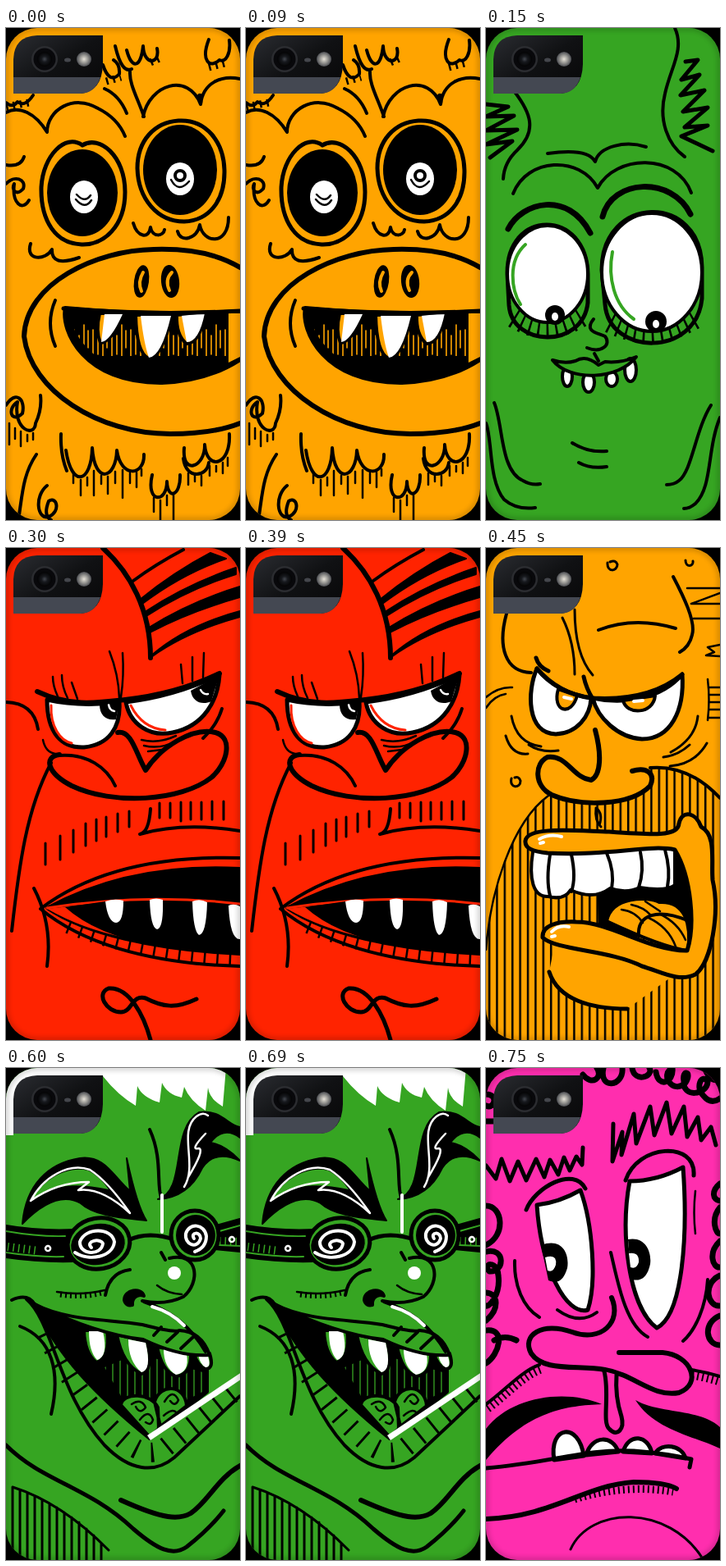
An HTML page for the animation above (900 ms loop, 285 px wide and 600 px high).

```html
<!DOCTYPE html>
<html lang="en">
<head>
<meta charset="utf-8">
<title>Monster phone cases</title>
<style>
html, body { margin: 0; width: 100%; height: 100%; overflow: hidden; background: #000; }
svg { display: block; width: 100vw; height: 100vh; fill: none; stroke: #000; stroke-width: 4; stroke-linecap: round; stroke-linejoin: round; }
.face { visibility: hidden; animation: show 900ms step-end infinite; animation-delay: calc(var(--i) * 150ms - 900ms); }
@keyframes show { 0% { visibility: visible; } 16.6667%, 100% { visibility: hidden; } }
.orange { fill: #ffa400; } .green { fill: #36a522; } .red { fill: #ff2300; } .pink { fill: #ff2eae; }
.w { fill: #fff; } .k { fill: #000; } .flat { stroke: none; }
.thin { stroke-width: 2.5; } .mid { stroke-width: 5; } .bold { stroke-width: 6; }
.light { stroke: #fff; }
.tick { stroke-linecap: butt; stroke-width: var(--w, 14); stroke-dasharray: var(--d, 2.5 6); }
</style>
</head>
<body>
<svg viewBox="0 0 285 600" preserveAspectRatio="none">
<defs>
  <clipPath id="case"><rect width="285" height="600" rx="38"/></clipPath>
  <pattern id="drip" width="23" height="200" patternUnits="userSpaceOnUse">
    <path stroke="#ffa400" stroke-width="1.6" d="M3 162V205M8 169V190M14 168V200M20 175V198"/>
  </pattern>
  <pattern id="beard" width="9.4" height="20" patternUnits="userSpaceOnUse"><path d="M4 0V20" stroke-width="2.5"/></pattern>
  <pattern id="fangs" width="9" height="20" patternUnits="userSpaceOnUse"><path d="M4 0V20" stroke="#36a522" stroke-width="1.3"/></pattern>
  <linearGradient id="glass" x2="1" y2="1"><stop stop-color="#2a2c31"/><stop offset=".5" stop-color="#101113"/><stop offset="1" stop-color="#070708"/></linearGradient>
  <radialGradient id="lens"><stop stop-color="#444850"/><stop offset=".4" stop-color="#17191e"/><stop offset="1" stop-color="#030304"/></radialGradient>
  <radialGradient id="flash"><stop stop-color="#e6e2d8"/><stop offset=".5" stop-color="#9b9a96"/><stop offset="1" stop-color="#4b4d52"/></radialGradient>
  <filter id="soft"><feGaussianBlur stdDeviation="3"/></filter>
</defs>
<g clip-path="url(#case)">

<g class="face" style="--i:0">
  <rect class="flat orange" width="285" height="600"/>
  <path d="M0 91Q8 98 14 90Q23 97 33 82M118 45Q126 69 138 56Q139 44 131 39M133 22Q141 56 153 50M147 27C153 50 164 50 167 22C168 47 188 44 184 25M247 14C237 40 248 50 260 39C268 43 274 30 272 15"/>
  <path class="tick" style="--w:9" d="M0 96L28 91M122 65L140 60M176 42L187 37M247 48L270 42"/>
  <path d="M151 53C150 68 160 85 168 108M120 74Q138 82 147 104M0 103C16 94 36 104 50 127C50 100 82 80 112 98Q136 110 145 132M167 108C175 68 222 54 237 93C230 78 241 78 237 93C240 67 262 57 285 62"/>
  <path class="orange mid" d="M93 143C114 130 145 156 145 200C145 242 119 265 92 264C61 263 42 236 43 194C45 156 72 128 93 143ZM210 113C244 111 265 139 266 173C267 212 246 235 217 236C184 236 161 208 160 171C160 137 181 115 210 113Z"/>
  <g class="k flat"><ellipse cx="93" cy="201" rx="43" ry="53"/><ellipse cx="212" cy="173" rx="45" ry="55"/></g>
  <g class="w flat"><ellipse cx="95" cy="206" rx="17" ry="20"/><ellipse cx="212" cy="184" rx="17" ry="20"/></g>
  <path class="thin" d="M86 203Q96 214 103 204M85 209Q96 222 104 210M201 185Q210 202 223 187"/>
  <circle cx="212" cy="180" r="6"/>
  <path d="M0 167Q18 170 22 157M0 190C10 179 25 184 21 196C13 205 6 198 10 190C7 214 20 224 28 210M30 263C23 284 48 284 56 270Q55 292 89 280M155 238C160 255 174 258 176 243C178 256 192 254 193 246M209 248C212 262 233 258 236 240C240 263 271 266 271 231"/>
  <path class="bold" d="M22 376C24 311 110 271 180 270Q246 268 285 292M22 376C30 442 112 495 200 495Q252 495 285 482"/>
  <path d="M60 332Q48 360 60 388"/>
  <g class="k"><ellipse cx="165" cy="309" rx="7" ry="18" transform="rotate(8 165 309)"/><ellipse cx="200" cy="309" rx="9" ry="18" transform="rotate(-6 200 309)"/></g>
  <path stroke="#ffa400" d="M167 298Q160 310 165 321M202 298Q193 307 199 320"/>
  <path class="k" d="M72 341C66 369 94 434 190 433Q245 431 285 405V345Q180 351 72 341Z"/>
  <path class="flat" fill="url(#drip)" d="M78 348C80 378 115 424 190 426Q235 424 270 405V348Z"/>
  <path class="orange flat" d="M271 348H285V401L271 408Z"/>
  <path class="orange" d="M114 348H143Q129 383 115 384Q109 370 114 348ZM158 350H202Q190 402 174 403Q159 397 158 350ZM208 350L243 347Q236 385 220 385Q207 375 208 350Z"/>
  <path class="w flat" d="M120 349H142Q127 382 116 383ZM164 351H201Q189 401 174 402Q168 385 164 351ZM214 351L242 348Q235 383 220 383Z"/>
  <path class="mid" d="M70 342Q180 351 285 345"/>
  <path d="M0 460C12 441 24 453 20 470C6 483 1 464 14 456C8 490 35 500 36 482Q44 465 42 448M37 520C20 545 20 570 15 600M50 558C34 571 38 600 52 596C67 590 62 570 52 577Q45 595 55 600M67 495Q66 520 74 540M73 515C80 562 104 555 105 512C108 558 134 550 135 515C140 550 169 546 168 520M178 545C170 580 196 580 196 553C197 577 213 570 212 545M217 512C214 547 243 535 242 508C244 540 274 535 272 495M216 525C219 551 245 548 247 530"/>
  <path class="thin" d="M4 482V508M11 488V501M18 492V510M26 496V504M33 494V502M82 543V555M91 551V570M99 548V558M107 540V570M116 546V556M124 547V568M133 541V555M142 539V573M151 543V555M159 542V560M165 538V546M180 573V590M188 576V600M196 570V582M204 570V600M222 543V557M230 546V553M238 546V558M248 534V546M256 534V541M264 530V543M270 524V534"/>
</g>

<g class="face" style="--i:1">
  <rect class="flat green" width="285" height="600"/>
  <path d="M35 78C54 103 63 125 38 149Q22 164 21 184M230 0C242 26 225 48 218 80C210 112 221 142 242 157"/>
  <path class="mid" d="M0 93L27 96L0 108L34 107L0 125L38 124L0 142L32 138L5 158M243 41L258 39L238 63L260 57L237 82L266 76L240 102L270 97L242 121L270 119L238 132L276 150"/>
  <path d="M75 153Q124 146 133 163C138 144 170 137 195 145M33 202C50 158 114 155 136 195C158 154 232 152 250 201"/>
  <path stroke-width="7" d="M27 245C44 212 100 198 127 250M142 230C153 184 226 180 249 227"/>
  <path class="green mid" d="M26 300C25 220 122 220 124 300V335C118 391 32 390 28 338ZM141 295C141 203 262 200 263 292V330C256 402 150 400 145 337Z"/>
  <path class="tick" style="--w:26;--d:2.5 8" d="M34 353Q75 379 119 350M151 359Q203 386 258 352"/>
  <g class="w"><ellipse cx="75" cy="300" rx="49" ry="59"/><ellipse cx="202" cy="298" rx="61" ry="72"/></g>
  <path stroke="#36a522" d="M48 264C26 284 31 320 42 337M154 273C148 304 156 338 180 355"/>
  <g class="k flat"><circle cx="84" cy="350" r="12"/><circle cx="207" cy="358" r="13"/></g>
  <g class="w flat"><ellipse cx="84" cy="352" rx="4" ry="5"/><ellipse cx="207" cy="361" rx="4" ry="5"/></g>
  <path d="M131 355C118 371 138 372 145 376C153 386 141 397 123 390M132 397L137 406"/>
  <g class="w"><ellipse cx="99" cy="425" rx="6" ry="12"/><ellipse cx="125" cy="432" rx="7" ry="12"/><ellipse cx="153" cy="428" rx="7" ry="9"/><ellipse cx="176" cy="417" rx="7" ry="14"/></g>
  <path class="green" d="M81 405C102 432 162 429 183 401Q164 409 145 407L137 411Q122 398 109 406Q96 410 81 405Z"/>
  <path d="M105 506Q124 518 147 516M113 530Q127 538 147 535M10 457C21 483 17 540 45 552Q55 558 66 556M0 482C8 503 3 552 22 575Q37 588 60 585M274 460C255 490 251 540 235 552Q229 557 220 557M285 475C269 513 276 560 255 580Q248 586 241 586"/>
</g>

<g class="face" style="--i:2">
  <rect class="flat red" width="285" height="600"/>
  <path class="bold" d="M118 0C151 30 176 75 176 134"/>
  <path d="M155 40Q182 20 216 2"/>
  <path class="k" stroke-width="2" d="M163 63Q205 29 249 6L268 13Q215 31 166 68ZM169 78Q220 44 280 24V32Q220 51 171 83ZM174 97Q225 65 285 47V60Q225 77 175 103ZM177 131Q220 94 285 77V84Q220 102 177 133Z"/>
  <path class="w mid" d="M50 185C50 225 67 244 95 243C126 240 140 218 138 188Q90 194 50 185ZM146 188C151 215 175 231 203 225C242 217 258 185 260 155Q205 181 146 188Z"/>
  <path stroke="#ff2300" stroke-width="3" d="M55 192C54 218 66 235 80 238M152 192Q166 220 194 222"/>
  <path class="k flat" d="M114 191C114 204 122 211 134 209L138 188ZM225 174C227 188 239 192 250 187L260 155Z"/>
  <path class="light thin" d="M125 191Q126 198 132 199M237 173Q240 179 246 178"/>
  <path class="bold" d="M38 175C78 194 111 189 145 185Q208 178 260 153"/>
  <path class="thin" d="M126 126Q137 154 138 183M142 128Q144 155 140 182M57 157Q57 168 63 181M68 155Q68 169 75 183M80 164L87 184M213 142L215 165M227 133V162M241 128L240 158M45 234Q48 249 60 251M165 234Q186 239 207 229M168 241Q188 246 208 235M173 248L190 246"/>
  <path d="M263 196Q257 216 240 232"/>
  <path class="bold" d="M136 225C153 222 158 250 170 271C189 242 228 218 255 225C277 231 270 263 250 280C213 309 130 314 80 290C49 274 46 254 65 252"/>
  <path d="M64 253C99 250 123 268 133 290M0 188Q34 189 39 221M55 262C25 318 16 386 7 467M34 415Q57 459 50 510"/>
  <path stroke-width="3" d="M48 360V386M66 351V380M82 344V371M97 336V363M110 331V357M122 328V352M136 324V346M150 321V340M187 311V329M200 311V329M213 310V333M225 310V331M238 310V331M251 309V331M265 309V331"/>
  <path d="M176 318Q174 347 163 349Q216 334 285 345"/>
  <path d="M42 440C100 396 180 375 285 378M42 440C90 480 170 507 285 510"/>
  <path class="k" d="M50 439C111 406 190 386 285 391V495C180 490 95 470 50 439Z"/>
  <path stroke="#ff2300" stroke-width="3" d="M50 439C125 427 208 425 285 434"/>
  <path class="red flat" d="M50 440Q94 435 120 433L145 475Q94 465 50 440Z"/>
  <path class="k flat" d="M72 438L121 431L180 484Q110 472 72 438Z"/>
  <path class="tick" style="--d:2.5 13" d="M75 463Q160 498 285 502"/>
  <path class="w flat" d="M121 431Q132 427 143 430Q143 457 134 457Q124 456 121 431ZM175 429Q183 426 191 429Q192 464 184 465Q176 463 175 429ZM227 431Q236 427 245 432Q244 471 235 472Q228 467 227 431ZM271 436Q278 433 285 437V477Q273 478 271 436Z"/>
  <path class="mid" d="M176 600C168 570 150 535 125 537C109 543 122 566 140 566C154 566 153 544 170 549C191 560 207 562 232 550"/>
</g>

<g class="face" style="--i:3">
  <rect class="flat orange" width="285" height="600"/>
  <path class="flat" fill="url(#beard)" d="M0 490C5 420 31 335 76 302C110 315 178 315 200 270Q247 264 285 305V600H0Z"/>
  <path class="thin" d="M0 490C5 420 31 335 76 302"/>
  <path d="M25 80C14 120 23 151 55 152M228 35C240 58 256 90 251 106Q248 120 236 127M137 100Q181 83 231 98M200 268Q247 264 285 305"/>
  <path d="M93 85Q108 115 108 154M108 75Q108 130 130 155" stroke-width="3"/>
  <path d="M148 18C147 30 160 29 160 20Q158 14 151 17M243 15C243 24 253 23 252 16M31 281C28 293 42 294 42 284Q40 278 35 280" stroke-width="3"/>
  <path class="thin" d="M245 49H285M250 68L285 55M250 68H285M253 86H285M285 118L270 121L278 127L268 131L285 132M270 160Q273 185 270 210M272 170H285M273 179H285M273 188H285M273 197H285M272 207H285M0 182Q15 169 32 170M0 195Q10 180 24 178"/>
  <path class="w mid" d="M62 147C50 174 49 226 85 227C111 226 127 205 128 183Q89 178 62 147ZM130 183C166 191 213 185 239 154C242 198 225 233 190 233C160 231 136 207 130 183Z"/>
  <path class="orange" d="M88 172C80 200 104 206 111 180ZM167 186C171 204 204 203 206 180Z"/>
  <path class="light" d="M95 182L104 184M180 187L191 186"/>
  <path class="mid" d="M61 134Q64 145 76 150M62 147Q85 177 130 183Q199 187 239 154M119 157Q122 171 130 184"/>
  <path d="M31 205Q37 238 67 242M24 229Q31 253 51 251M52 240Q67 250 88 247M258 205Q255 233 225 249M269 238Q254 264 224 266M248 240Q234 253 216 255" stroke-width="3"/>
  <path class="orange bold" d="M133 222C141 252 140 277 128 283C105 280 99 252 75 255C59 262 58 290 80 301C114 316 176 315 200 290C207 274 195 267 178 272"/>
  <path stroke-width="3" d="M134 317Q143 324 138 338M134 317Q132 332 140 340"/>
  <path class="orange flat" d="M77 517C88 551 128 562 172 562L230 520L85 475Z"/>
  <path class="mid" d="M77 517C88 551 128 562 172 562"/>
  <path class="k flat" d="M135 400L228 370C252 403 253 465 245 490L137 462Z"/>
  <path class="orange" d="M147 455C153 424 198 425 211 432C244 430 250 461 246 491Q215 487 147 455Z"/>
  <path d="M186 473C184 447 209 439 245 454"/>
  <path class="thin" d="M198 451Q222 462 231 486M211 446Q234 457 243 478M165 441Q182 443 191 457M177 435Q192 438 201 448M194 431L212 443"/>
  <path class="w" d="M57 371C52 403 57 426 76 425Q95 430 103 417Q131 430 151 415Q171 422 187 414Q219 419 230 411V366H57Z"/>
  <path d="M78 374Q73 405 78 424M104 374Q110 402 104 419M147 372Q157 395 153 416M188 371Q193 393 186 414M218 368Q225 393 221 413"/>
  <path class="orange mid" d="M48 357C50 339 110 345 150 346C204 350 234 352 235 336C239 318 256 323 262 340C281 350 274 382 276 405C285 444 275 505 255 520C235 530 214 517 190 510C150 490 86 491 69 475C68 460 87 455 110 456C152 456 200 492 245 491C255 460 250 401 230 368C200 361 150 376 75 372C56 370 47 366 48 357Z"/>
  <path class="light" d="M65 355Q77 348 92 352M66 360L70 359M80 468Q88 459 101 462M80 474L84 473"/>
</g>

<g class="face" style="--i:4">
  <rect class="flat green" width="285" height="600"/>
  <path class="w flat" d="M0 0H268L264 47Q248 38 246 24L243 52Q224 40 217 23L214 36Q196 32 190 18L187 42Q166 36 160 22L158 46Q136 33 118 10V40H9V82H0Z"/>
  <path class="k" stroke-width="2" d="M20 190C24 142 52 116 90 110C121 106 130 132 151 150L147 110C155 147 163 174 171 186C145 183 108 181 91 165Q61 148 20 190ZM185 160C221 150 199 74 235 54C262 50 270 70 285 72V85Q265 70 249 91Q267 94 285 113Q254 99 239 122Q222 158 185 160Z"/>
  <path class="green flat" d="M30 162C45 137 72 119 100 125Q114 132 125 148Q60 134 30 162Z"/>
  <path class="light thin" d="M30 162C45 133 76 115 102 124Q124 138 151 177Q116 145 88 149L101 139Q62 139 30 162M217 145C234 118 209 77 232 59Q240 53 246 58M243 80Q223 101 235 98Q242 100 222 133"/>
  <path d="M175 75C191 110 183 142 189 158"/>
  <path class="light" d="M190 155V200"/>
  <path class="k" d="M0 193Q40 200 84 198L81 235Q40 236 0 230ZM252 194L285 185V223L254 220Z"/>
  <path stroke="#36a522" stroke-width="2" d="M0 199Q40 206 72 205M0 225Q40 231 70 230M260 199L285 192M260 216L285 217"/>
  <path class="tick" stroke="#36a522" style="--w:10;--d:1.5 5" d="M2 218L40 223M260 211L285 212"/>
  <path class="light thin" d="M51 217a3 3 0 1 0 .1 0M275 206a3 3 0 1 0 .1 0"/>
  <path class="mid" d="M149 210Q174 198 207 210"/>
  <g class="green mid"><ellipse cx="113" cy="214" rx="38" ry="31" transform="rotate(-10 113 214)"/><ellipse cx="230" cy="204" rx="29" ry="30"/></g>
  <g class="k flat"><ellipse cx="112" cy="215" rx="33" ry="25" transform="rotate(-10 112 215)"/><ellipse cx="231" cy="204" rx="24" ry="25"/></g>
  <path class="light" d="M104 219C96 211 115 207 118 214C116 230 89 228 90 212C96 194 129 194 132 212C130 231 101 236 84 225M229 208C224 200 237 199 237 208C233 222 217 215 219 202C223 188 242 190 244 205Q244 219 230 224"/>
  <path d="M121 277Q126 249 151 246M199 232C235 223 237 262 216 279Q193 290 166 284M189 225L194 234"/>
  <path class="k" d="M144 283C144 270 165 267 168 278C161 275 153 280 154 289Q146 291 144 283Z"/>
  <circle class="w flat" cx="205" cy="250" r="8"/>
  <path class="thin" d="M62 273Q91 278 120 271M184 265Q196 275 214 276"/>
  <path class="tick" style="--w:7;--d:2 4" d="M66 276Q94 280 116 274"/>
  <path class="green flat" d="M35 288L285 375V400L205 475C181 495 151 492 120 460C64 398 57 309 25 282Z"/>
  <path d="M7 283Q26 274 35 288M25 282C57 309 64 398 120 460C151 492 181 495 205 475L285 400"/>
  <path class="tick" style="--w:24;--d:3 17" d="M48 323C77 384 112 426 145 455Q170 476 191 465L285 389"/>
  <path class="k" d="M35 288C61 350 112 401 175 452L245 395V352Q205 357 170 335Q100 327 35 288Z"/>
  <path class="flat" fill="url(#fangs)" d="M120 365L160 348L243 372V393L210 410L140 400Z"/>
  <path class="green" d="M140 411C142 395 177 396 185 414L186 440L175 450ZM181 407C188 384 218 386 220 412L188 437Z"/>
  <path class="thin" d="M153 410Q165 402 170 414Q163 423 158 413M163 429Q174 415 179 429Q177 437 170 432M193 407Q203 390 210 405Q206 414 200 406M192 424Q203 414 208 421"/>
  <path class="green" d="M95 320H123Q127 354 110 359Q96 348 95 320ZM135 325L172 334Q180 370 165 373Q142 362 135 325ZM184 340L225 348Q226 374 207 376Q190 370 184 340ZM229 348H248Q254 367 243 367Q233 363 229 348Z"/>
  <path class="w flat" d="M101 321H118Q125 352 111 356Q101 346 101 321ZM149 331L170 335Q178 368 165 371Q149 358 149 331ZM192 343L220 349Q224 371 207 374Q192 365 192 343ZM234 349H245Q251 365 243 365Q236 361 234 349Z"/>
  <path class="green" d="M35 288C75 309 125 306 166 313Q204 323 211 320Q238 321 248 350Q213 353 167 331Q111 325 35 288Z"/>
  <path d="M168 285Q218 302 243 346M180 326L189 316M196 334L209 322M213 342L228 328"/>
  <path class="light" d="M178 291Q200 297 217 314"/>
  <path class="light" stroke-width="7" stroke-linecap="butt" d="M174 451L287 375"/>
  <path d="M17 315C56 330 67 370 55 422"/>
  <path class="mid" d="M0 460C45 505 100 510 155 562C184 587 203 596 220 584Q248 562 265 540"/>
  <path class="bold" d="M140 527C193 551 211 551 225 543C246 529 258 500 285 485"/>
  <path stroke-width="3" d="M8 511Q68 530 125 588M8 511V600M17 515V600M26 518V600M35 522V600M44 526V600M53 531V600M62 536V600M71 542V600M80 548V600M89 554V600M98 562V600M107 570V600M116 580V600"/>
</g>

<g class="face" style="--i:5">
  <rect class="flat pink" width="285" height="600"/>
  <path stroke-width="7" d="M118 8C129 23 143 11 135 0M143 0C137 27 168 23 166 0M178 0C181 19 205 10 199 0M207 5C210 25 229 18 227 0C211 8 228 33 243 18C252 3 238 2 241 16C239 37 269 33 270 17C263 5 254 24 265 34Q274 45 285 37M268 4Q275 19 285 13M0 32C16 32 10 51 0 46M0 65H9M0 168C20 168 25 204 0 216M0 224C24 218 23 250 4 248C-5 238 14 234 15 253C18 276 4 292 0 290M0 308C16 295 16 275 0 274M0 320C25 317 16 350 0 360M10 332Q23 325 37 332M285 141C274 150 276 161 285 162M285 170C273 184 280 203 285 202M285 211C270 225 276 244 285 243M285 253C263 263 270 292 285 290M285 302C263 311 268 338 285 338"/>
  <path class="mid" d="M0 119L12 135L19 111L29 138L39 114L49 137L61 111L71 133L78 112L88 130L95 109L102 125L110 108L117 118L118 97M155 68L154 114L166 78L165 106L180 56L183 92L200 47L205 82L220 42L226 80L241 47L245 84L258 60L262 88L274 72L280 94"/>
  <path class="w mid" d="M62 167Q89 164 115 149C130 190 135 262 124 295C98 303 67 244 62 167ZM175 138Q208 138 240 121C246 203 240 301 208 317C174 292 163 202 175 138Z"/>
  <path class="k flat" d="M67 216C93 206 102 227 99 244C94 261 86 263 76 259ZM173 209C194 205 202 224 200 239C196 258 187 260 177 258Z"/>
  <path class="w flat" d="M72 231Q87 226 85 240Q82 250 75 247ZM174 226Q187 224 186 237Q183 246 176 243Z"/>
  <path class="mid" d="M49 173C59 146 107 119 121 147M170 137C184 93 256 88 253 131"/>
  <path d="M35 235C34 265 45 292 65 304M87 295Q113 314 135 298M152 225C160 258 169 313 197 328M270 258C268 291 255 320 240 333"/>
  <path class="thin" d="M255 150Q252 177 255 202"/>
  <path class="bold" d="M153 280C166 310 140 335 105 322C68 309 43 326 55 348C70 371 112 362 145 368C181 374 203 402 235 396C264 385 250 350 215 347H162"/>
  <path class="pink mid" d="M144 370C151 398 141 432 150 440C160 451 169 440 165 425Q157 401 159 374"/>
  <path d="M0 410C21 395 44 369 65 362M250 368Q269 371 285 376"/>
  <path class="tick" style="--w:11;--d:2 4" d="M2 415C23 400 46 374 67 367M251 374Q269 377 285 382"/>
  <path class="k flat" d="M0 440C30 400 98 391 141 410C99 412 51 417 0 478ZM182 405C212 422 260 415 285 438V464C250 448 205 441 182 405Z"/>
  <path class="w mid" d="M83 478C76 436 113 431 119 473ZM122 472C129 447 155 448 161 468ZM167 468C174 444 198 448 202 470ZM206 470C214 456 239 460 243 476Z"/>
  <path class="mid" d="M0 488C82 481 120 464 180 467Q219 470 250 477L248 487"/>
  <path class="bold" d="M0 550C82 547 119 509 180 505Q219 505 232 513"/>
  <path class="tick" style="--w:9;--d:2 4" d="M108 526Q170 507 228 517"/>
  <path d="M103 587C126 535 222 530 265 600" stroke-width="3"/>
</g>

<rect width="285" height="600" rx="38" stroke-width="5" opacity=".22" filter="url(#soft)"/>
<path class="flat" fill="url(#glass)" d="M9 80V38Q10 10 38 9H118V44Q117 77 91 80Z"/>
<path class="flat" fill="#444852" d="M9 60H115Q109 79 91 80H9Z"/>
<g class="flat">
  <circle cx="47" cy="38" r="16" fill="#2b2c30"/>
  <circle cx="47" cy="38" r="13.5" fill="#08080b"/>
  <circle cx="47" cy="38" r="9" fill="url(#lens)"/>
  <ellipse cx="75" cy="39" rx="4" ry="2.5" fill="#44464c"/>
  <circle cx="95" cy="38" r="9" fill="url(#flash)"/>
</g>
</g>
</svg>
</body>
</html>
```
